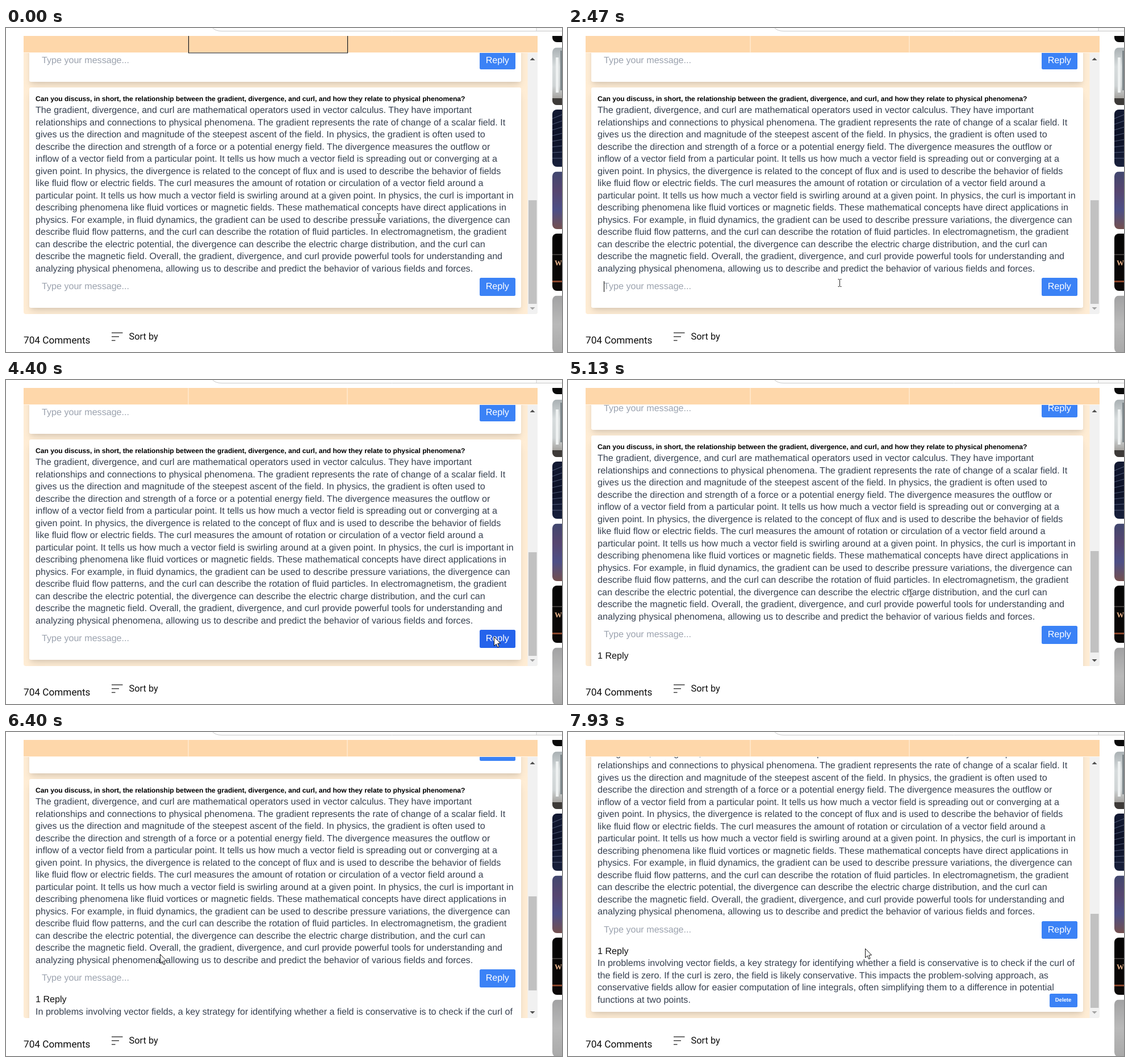
An HTML page with a canvas for the animation above (8000 ms loop, 979 by 572 pixels).

```html
<!DOCTYPE html>
<html lang="en">
<head>
<meta charset="utf-8">
<title>Comment reply</title>
<style>
  html, body { margin: 0; width: 100%; height: 100%; overflow: hidden; background: #fff; }
  body { position: relative; text-rendering: geometricPrecision; }
  canvas, div, span { position: absolute; white-space: pre; }
  canvas { left: 0; top: 0; }
  #view { left: 0; top: 44px; width: 918px; height: 461px; overflow: hidden; }
  #doc { left: 0; width: 918px; height: 700px; font: 16.125px/21.5px "Liberation Sans", Arial, sans-serif; color: #374151; }
  .card { left: 41px; width: 866px; background: #fff; border-radius: 3px;
    box-shadow: 0 10px 15px -3px rgba(0,0,0,.1), 0 4px 6px -2px rgba(0,0,0,.08); }
  .title { left: 52px; top: 116.7px; font-weight: bold; font-size: 12.094px; line-height: 16px; color: #000; }
  .hint, .btn { height: 31.5px; line-height: 31.5px; }
  .hint { left: 63px; color: #9ca3af; }
  .btn { left: 834px; width: 62.5px; text-align: center; color: #fff; background: #3b82f6; border-radius: 2.5px; }
  .btn.hot { background: #2563eb; }
  #field { left: 63px; top: 441px; width: 755px; height: 31.5px; line-height: 31.5px; overflow: hidden; }
  #typed { right: 2px; }
  #caret { top: 447px; width: 1.3px; height: 19px; background: #000; }
  #delete { left: 847.5px; top: 569.5px; width: 49px; height: 24px; line-height: 23px; font-size: 9.5px; font-weight: bold; }
  .page { font-family: Roboto, sans-serif; color: #0f0f0f; line-height: 24px; }
</style>
</head>
<body>
<canvas id="base" width="979" height="572"></canvas>
<span class="page" style="left:31px;top:539.5px;font-size:17.2px">704 Comments</span>
<span class="page" style="left:216.5px;top:534px;font-size:16.4px">Sort by</span>
<span style="left:966px;top:406px;font:bold 13px/18px 'Liberation Serif',serif;color:#e9b48c;width:13px;overflow:hidden">W</span>
<div id="view"><div id="doc">
  <div class="card" style="top:0;height:94.5px"></div>
  <span class="hint" style="top:41.5px">Type your message...</span>
  <div class="btn" style="top:41.5px">Reply</div>
  <div class="card" id="card" style="top:105px"></div>
  <span class="title">Can you discuss, in short, the relationship between the gradient, divergence, and curl, and how they relate to physical phenomena?</span>
  <div id="answer" style="left:52px;top:135.2px"></div>
  <span class="hint" id="hint" style="top:441px">Type your message...</span>
  <div id="field"><span id="typed"></span></div>
  <div id="caret"></div>
  <div class="btn" id="send" style="top:441px">Reply</div>
  <span id="count" style="left:52px;top:484px;color:#111">1 Reply</span>
  <div id="reply" style="left:52px;top:505.5px"></div>
  <div class="btn" id="delete">Delete</div>
</div></div>
<canvas id="top" width="979" height="572"></canvas>
<script>
const LOOP = 8000, STEP = 1000 / 15;
const VIEW = 461, TRACK = 419, BASE_H = 1056;
const PASTE = 2930, SENT = 4130, COUNTED = 4530, OPENED = 6000;
const $ = id => document.getElementById(id);
const base = $('base').getContext('2d'), g = $('top').getContext('2d');

$('answer').textContent = [
  'The gradient, divergence, and curl are mathematical operators used in vector calculus. They have important',
  'relationships and connections to physical phenomena. The gradient represents the rate of change of a scalar field. It',
  'gives us the direction and magnitude of the steepest ascent of the field. In physics, the gradient is often used to',
  'describe the direction and strength of a force or a potential energy field. The divergence measures the outflow or',
  'inflow of a vector field from a particular point. It tells us how much a vector field is spreading out or converging at a',
  'given point. In physics, the divergence is related to the concept of flux and is used to describe the behavior of fields',
  'like fluid flow or electric fields. The curl measures the amount of rotation or circulation of a vector field around a',
  'particular point. It tells us how much a vector field is swirling around at a given point. In physics, the curl is important in',
  'describing phenomena like fluid vortices or magnetic fields. These mathematical concepts have direct applications in',
  'physics. For example, in fluid dynamics, the gradient can be used to describe pressure variations, the divergence can',
  'describe fluid flow patterns, and the curl can describe the rotation of fluid particles. In electromagnetism, the gradient',
  'can describe the electric potential, the divergence can describe the electric charge distribution, and the curl can',
  'describe the magnetic field. Overall, the gradient, divergence, and curl provide powerful tools for understanding and',
  'analyzing physical phenomena, allowing us to describe and predict the behavior of various fields and forces.'
].join('\n');
const reply = [
  'In problems involving vector fields, a key strategy for identifying whether a field is conservative is to check if the curl of',
  'the field is zero. If the curl is zero, the field is likely conservative. This impacts the problem-solving approach, as',
  'conservative fields allow for easier computation of line integrals, often simplifying them to a difference in potential',
  'functions at two points.'
];
$('reply').textContent = reply.join('\n');
$('typed').textContent = reply.join(' ');

function rect(c, color, x, y, w, h) {
  c.fillStyle = color;
  c.fillRect(x, y, w, h);
}

function line(c, color, width, ...pts) {
  c.strokeStyle = color;
  c.lineWidth = width;
  c.beginPath();
  for (let i = 0; i < pts.length; i += 2) c.lineTo(pts[i], pts[i + 1]);
  c.stroke();
}

// Rounded side picture: vertical gradient plus optional details
function picture(y, h, colors, details) {
  base.save();
  base.beginPath();
  base.roundRect(962, y, 60, h, 8);
  base.clip();
  const fill = base.createLinearGradient(0, y, 0, y + h);
  colors.forEach((c, i) => fill.addColorStop(i / Math.max(1, colors.length - 1), c));
  rect(base, fill, 962, y, 60, h);
  if (details) details();
  base.restore();
}

function drawPage() {
  rect(base, '#fff', 0, 0, 979, 572);
  picture(-76, 101, ['#0a0a0a', '#0a0a0a']);
  picture(34.5, 101.5, ['#a9b0b3', '#d7dcdd', '#cfd4d5', '#8f8983'], () => {
    rect(base, '#eef1f1', 968, 52, 5, 62);
    rect(base, '#7e878b', 976, 40, 3, 70);
    rect(base, '#3d3a38', 962, 124, 17, 12);
  });
  picture(144, 101, ['#131a33', '#0c1126', '#18203c'], () => {
    for (let i = 0; i < 8; i++)
      line(base, 'rgba(165,180,215,.45)', 1, 962, 160 + i * 10, 979, 153 + i * 11);
  });
  picture(253.5, 101.5, ['#41476f', '#56456f', '#4d4f86', '#74504f']);
  picture(363, 101, ['#050505', '#0b0807'], () => {
    line(base, '#77716c', 1, 962, 400, 979, 400);
    rect(base, '#8a452b', 962, 446, 17, 3);
  });
  picture(472.5, 101, ['#a2a2a3', '#b9b9b9', '#a9a9a9']);
  rect(base, '#fff', 0, 0, 979, 14);

  // Search box edge
  rect(base, '#f8f8f8', 934, 0, 45, 5);
  base.strokeStyle = '#c9c9c9';
  base.lineWidth = 1;
  base.beginPath();
  base.moveTo(364, 0);
  base.quadraticCurveTo(369, 5.5, 380, 5.5);
  base.lineTo(979, 5.5);
  base.moveTo(934, 0);
  base.lineTo(934, 5.5);
  base.stroke();

  // Panel and its header
  base.fillStyle = '#ffedd5';
  base.beginPath();
  base.roundRect(31, 43, 905, 462, [0, 0, 4, 4]);
  base.fill();
  rect(base, '#fed7aa', 31, 14, 905, 29);
  rect(base, '#fff6ea', 31, 43, 905, 1);
  rect(base, '#fff3e2', 320.5, 14, 1, 29);
  rect(base, '#fff3e2', 600.5, 14, 1, 29);

  [19.5, 13, 6.5].forEach((w, i) => rect(base, '#333', 186, 537.5 + i * 6.7, w, 1.4));
}

const mix = (a, b, u) => a + (b - a) * u;
const part = (t, from, len) => Math.min(1, Math.max(0, (t - from) / len));
const easeOut = u => 1 - (1 - u) ** 2;
const smooth = u => u * u * (3 - 2 * u);

// Pointer stops: time, x, y
const STOPS = [
  [330, 657, 334], [800, 876, 486], [1000, 866, 456], [1530, 866, 456], [2400, 479, 450],
  [3330, 479, 450], [3930, 859, 453], [4400, 859, 453], [4930, 604, 376], [5400, 604, 376],
  [5930, 78, 470], [6000, 78, 470], [6400, 271, 392], [6530, 284, 388], [6800, 292, 394],
  [7330, 354, 394], [7600, 354, 394], [7930, 523, 382]
];

function pointerAt(t) {
  const i = STOPS.findIndex(s => s[0] > t);
  if (i === 0) return STOPS[0].slice(1);
  if (i < 0) return STOPS[STOPS.length - 1].slice(1);
  const [a, x0, y0] = STOPS[i - 1], [b, x1, y1] = STOPS[i];
  const u = smooth((t - a) / (b - a));
  return [mix(x0, x1, u), mix(y0, y1, u)];
}

function drawBeam(x, y) {
  x = Math.round(x) - .5;
  y = Math.round(y);
  line(g, '#222', 1, x, y - 6, x, y + 6);
  for (const s of [-1, 1])
    line(g, '#222', 1, x - 3, y + s * 6.5, x - 1, y + s * 6.5, x, y + s * 5.5, x + 1, y + s * 6.5, x + 3, y + s * 6.5);
}

function drawArrow(x, y) {
  const p = [0, 0, 0, 16, 3.7, 12.6, 6.2, 18.3, 8.6, 17.3, 6.2, 11.7, 11, 11.3];
  g.beginPath();
  for (let i = 0; i < p.length; i += 2) g.lineTo(x + p[i] + .5, y + p[i + 1] + .5);
  g.closePath();
  g.fillStyle = '#fff';
  g.fill();
  g.strokeStyle = '#111';
  g.lineWidth = 1;
  g.stroke();
}

function triangle(color, y, dir) {
  g.fillStyle = color;
  g.beginPath();
  g.moveTo(922.5, y + 2 * dir);
  g.lineTo(931.5, y + 2 * dir);
  g.lineTo(927, y - 2.5 * dir);
  g.fill();
}

function drawScrollbar(off, growth) {
  const h = BASE_H + growth;
  g.fillStyle = '#f1f1f1';
  g.beginPath();
  g.roundRect(918.5, 44, 17.5, 461, [0, 0, 4, 0]);
  g.fill();
  rect(g, '#c1c1c1', 920, 68 + (BASE_H - VIEW + off) / h * TRACK, 14.5, VIEW / h * TRACK);
  triangle('#505050', 55, 1);
  triangle(growth - off > .5 ? '#505050' : '#a3a3a3', 495, -1);
}

const show = (id, on) => { $(id).style.display = on ? 'block' : 'none'; };

function draw(time) {
  // The screen refreshes 15 times a second, on times rounded to 10 ms
  const t = Math.round(Math.floor((time % LOOP + 8) / STEP) * STEP / 10) * 10;
  const scroll = 22 * easeOut(part(t, 5090, 229)) + 85.5 * easeOut(part(t, 6400, 249));
  const off = Math.round(scroll * 2) / 2;
  const growth = t >= OPENED ? 107.5 : t >= COUNTED ? 22 : 0;
  const pasted = t >= PASTE && t < SENT;
  const [x, y] = pointerAt(t);

  $('doc').style.top = -44 - off + 'px';
  $('card').style.height = 388.5 + growth + 'px';
  show('hint', !pasted);
  show('field', pasted);
  show('count', t >= COUNTED);
  show('reply', t >= OPENED);
  show('delete', t >= OPENED);
  show('caret', t >= 2330 && t < SENT && (t < PASTE || Math.floor((t - PASTE) / 470) % 2 === 0));
  $('caret').style.left = (pasted ? 816 : 63) + 'px';
  const hot = x >= 834 && x < 897 && y >= 441 - off && y < 472.5 - off;
  $('send').classList.toggle('hot', hot);

  g.clearRect(0, 0, 979, 572);
  drawScrollbar(off, growth);
  if (t < 1270) line(g, '#111', 1.2, 321.5, 14, 321.5, 44, 601.5, 44, 601.5, 14);
  if (t < 5930 && x < 832 && y < 472 - off) drawBeam(x, y);
  else drawArrow(x, y);
}

drawPage();
const start = performance.now();
function tick() {
  draw(performance.now() - start);
  requestAnimationFrame(tick);
}
tick();
</script>
</body>
</html>
```
